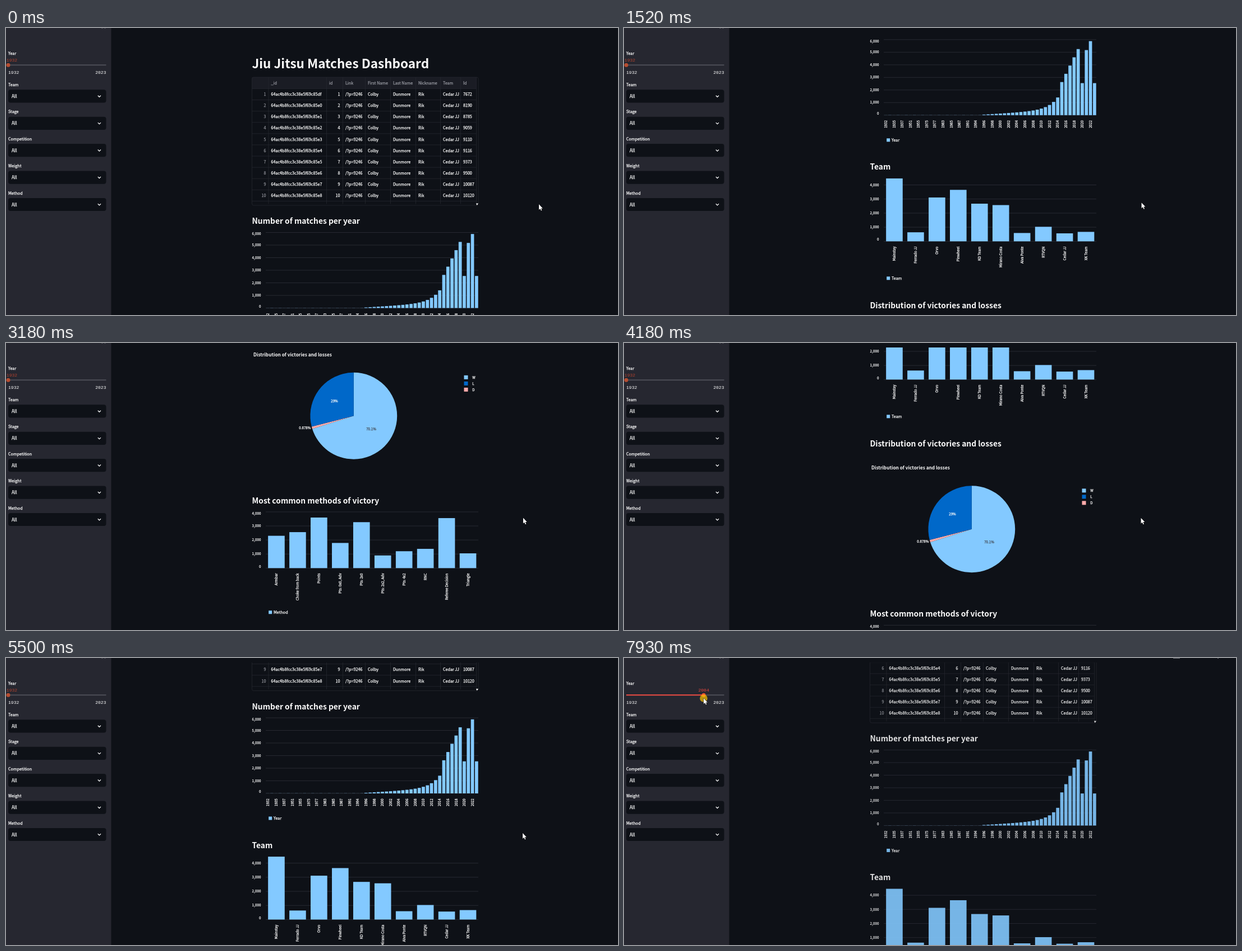
An HTML page with a canvas for the animation above (8 s loop, 1091 px wide and 513 px high).

```html
<!DOCTYPE html>
<html lang="en">
<head>
<meta charset="utf-8">
<title>Jiu Jitsu Matches Dashboard</title>
<style>
html, body { margin: 0; width: 100%; height: 100%; overflow: hidden; background: #0e1117; }
canvas { display: block; }
</style>
</head>
<body>
<canvas id="stage" width="1091" height="513"></canvas>
<script>
const ctx = document.getElementById('stage').getContext('2d');
const LOOP = 8000, STEP = 110.57, NOTCH = 57.45;
const SANS = '"Noto Sans CJK JP", "Noto Sans CJK SC", "Noto Sans CJK", "Noto Sans", sans-serif';
const MONO = '"Liberation Mono", monospace';
const BG = '#0e1117', PANEL = '#262730', WHITE = '#fafafa', SKY = '#83c9ff', BLUE = '#0068c9', PINK = '#ffabab';
const GRID = '#2e3039', BORDER = '#25272f';

const clamp01 = v => Math.min(1, Math.max(0, v));

// Wheel bursts, timed in steps of the recording's frame rate.
const bursts = [
  { start: 2, length: 5, notches: 3, power: 1.9 },
  { start: 8, length: 4, notches: 3 },
  { start: 13, length: 5, notches: 3 },
  { start: 19, length: 5, notches: 3 },
  { start: 25, length: 3, notches: 3.5, power: 0.36 },
  { start: 33, length: 3, notches: -4 },
  { start: 39, length: 4, notches: -4 },
  { start: 45, length: 4, notches: -4 }
];
const scrollAt = step => bursts.reduce((sum, { start, length, notches, power = 1 }) =>
  sum + NOTCH * notches * clamp01((step - start) / length) ** power, 0);

const cursorPath = [
  { step: -1, x: 950, y: 315 }, { step: 1, x: 923, y: 312 }, { step: 50, x: 921, y: 313 },
  { step: 52, x: 853, y: 160 }, { step: 53, x: 114, y: 99 }
];

function cursorAt(step) {
  const next = cursorPath.findIndex(point => point.step >= step);
  const b = cursorPath[next], a = cursorPath[next - 1] || b;
  const u = clamp01((step - a.step) / (b.step - a.step || 1));
  return [a.x + (b.x - a.x) * u, a.y + (b.y - a.y) * u];
}

function rect(x, y, w, h, color) {
  ctx.fillStyle = color;
  ctx.fillRect(x, y, w, h);
}

function line(x1, y1, x2, y2, color) {
  ctx.strokeStyle = color;
  ctx.lineWidth = 0.8;
  ctx.beginPath();
  ctx.moveTo(x1, y1);
  ctx.lineTo(x2, y2);
  ctx.stroke();
}

function disc(x, y, r, color) {
  ctx.fillStyle = color;
  ctx.beginPath();
  ctx.arc(x, y, r, 0, Math.PI * 2);
  ctx.fill();
}

function roundBox(x, y, w, h, r) {
  ctx.beginPath();
  ctx.roundRect(x, y, w, h, r);
}

// y is the middle of the capital letters; a hairline stroke firms up small regular text
function text(str, x, y, size, { color = WHITE, align = 'left', weight = 400, family = SANS } = {}) {
  const baseline = y + size * (family === MONO ? 0.33 : 0.366);
  ctx.font = `${weight} ${size}px ${family}`;
  ctx.textAlign = align;
  ctx.fillStyle = color;
  ctx.fillText(str, x, baseline);
  if (weight > 400 || family === MONO) return;
  ctx.strokeStyle = color;
  ctx.lineWidth = 0.25;
  ctx.strokeText(str, x, baseline);
}

const heading = (str, y) => text(str, 438.5, y, 13.83, { weight: 700 });

function table() {
  const left = 438.5, right = 838.5, top = 88, bottom = 317, head = 20.4, rowH = 20.1;
  const columns = [
    { x: 468, title: '_id', cell: i => '64ac4b8fcc3c38e5f69c85' + (0xdf + i).toString(16) },
    { x: 571.5, title: 'id', cell: () => '' },
    { x: 600.5, title: 'Link', cell: () => '/?p=9246' },
    { x: 640.5, title: 'First Name', cell: () => 'Colby' },
    { x: 685.5, title: 'Last Name', cell: () => 'Dunmore' },
    { x: 730.5, title: 'Nickname', cell: () => 'Rik' },
    { x: 774.5, title: 'Team', cell: () => 'Cedar JJ' },
    { x: 810.5, title: 'Id', cell: i => ids[i] }
  ];
  const ids = '7672 8190 8785 9059 9110 9116 9373 9500 10087 10120'.split(' ');

  rect(left, top, right - left, head, '#1a1c24');
  for (const { x, title } of columns) {
    line(x, top, x, bottom - 2.5, BORDER);
    text(title, x + 4.4, 98.2, 7.2, { color: '#94969e' });
  }
  line(right, top, right, bottom - 2.5, BORDER);
  for (let i = 0; i <= ids.length; i++) {
    const y = top + head + i * rowH;
    line(left, y, right, y, BORDER);
  }
  ids.forEach((_, i) => {
    const y = 118.5 + i * rowH;
    text(i + 1, 463.5, y, 7.2, { color: '#8b8d94', align: 'right' });
    text(i + 1, 595.5, y, 7.2, { align: 'right' });
    for (const { x, cell } of columns) text(cell(i), x + 4.4, y, 7.2);
  });

  ctx.strokeStyle = BORDER;
  ctx.lineWidth = 0.8;
  roundBox(left, top, 403.5, bottom - top, 3);
  ctx.stroke();
  ctx.fillStyle = WHITE;
  ctx.beginPath();
  ctx.moveTo(838, 313.5);
  ctx.lineTo(842, 313.5);
  ctx.lineTo(839.5, 317);
  ctx.fill();
}

function barChart({ axis, step, ticks, clampTop, bars, legend, legendY }) {
  const left = 463, pitch = 379.5 / bars.length, width = pitch * 0.78;
  for (let i = 0; i <= ticks; i++) {
    const y = axis - i * step;
    const shift = i === 0 ? -3 : i === ticks && clampTop ? 2.7 : 0;
    line(left, y, 842, y, GRID);
    text(i ? i + ',000' : '0', 454.5, y + shift, 6, { align: 'right', weight: 700 });
  }
  bars.forEach(([label, value], i) => {
    const center = left + pitch * (i + 0.5), h = value / 1000 * step;
    rect(center - width / 2, axis - h, width, h, SKY);
    ctx.save();
    ctx.translate(center, axis + 9.3);
    ctx.rotate(-Math.PI / 2);
    text(label, 0, 0, 6.2, { align: 'right' });
    ctx.restore();
  });
  rect(468.2, legendY - 3, 6, 6, SKY);
  text(legend, 477, legendY, 7.2);
}

// Slow growth, then exponential, then a steep linear climb with two short years.
function matchesIn(year) {
  if (year === 2020 || year === 2023) return 2545;
  if (year > 2020) return 5170 + 710 * (year - 2021);
  if (year > 2014) return 2630 + 655 * (year - 2015);
  return 45 + 20 * (year - 1996) + 1000 * 1.5 ** (year - 2014);
}

// Every second bar is labelled; the early years have gaps.
const earlyYears = '1932 1935 1937 1951 1955 1975 1977 1983 1985 1987 1991 1994'.split(' ');
const yearBars = earlyYears.flatMap(year => [[year, 4], ['', 8]]);
for (let year = 1996; year <= 2023; year++) yearBars.push([year % 2 ? '' : year, matchesIn(year)]);

const charts = [
  { axis: 500.5, step: 22.5, ticks: 6, clampTop: true, legend: 'Year', legendY: 545, bars: yearBars },
  { axis: 726, step: 25.2, ticks: 4, clampTop: false, legend: 'Team', legendY: 792,
    bars: [['Mainstay', 4460], ['Ferrado JJ', 640], ['Orvo', 3110], ['Pinwheel', 3650], ['KD Team', 2670],
      ['Mirano Costa', 2570], ['Alva Ponte', 590], ['RTVQN', 1030], ['Cedar JJ', 565], ['XK Team', 670]] },
  { axis: 1265.5, step: 25.1, ticks: 4, clampTop: true, legend: 'Method', legendY: 1344.5,
    bars: [['Armbar', 2300], ['Choke from back', 2560], ['Points', 3600], ['Pts: 0x0, Adv', 1790],
      ['Pts: 2x0', 3270], ['Pts: 2x2, Adv', 900], ['Pts: 4x2', 1200], ['RNC', 1370],
      ['Referee Decision', 3560], ['Triangle', 1050]] }
];

function pie() {
  const cx = 619.8, cy = 993.4, r = 77.4;
  let angle = -Math.PI / 2;
  [[0.7012, SKY], [0.00878, PINK], [0.29002, BLUE]].forEach(([share, color]) => {
    const end = angle + share * Math.PI * 2;
    ctx.fillStyle = color;
    ctx.beginPath();
    ctx.moveTo(cx, cy);
    ctx.arc(cx, cy, r, angle, end);
    ctx.fill();
    angle = end;
  });
  text('29%', 585.5, 966.7, 6.2, { align: 'center' });
  text('70.1%', 651, 1016.5, 6.2, { align: 'center', color: '#444b55' });
  text('0.878%', 543.5, 1015.2, 6.2, { align: 'right' });
  [['W', SKY], ['L', BLUE], ['D', PINK]].forEach(([name, color], i) => {
    const y = 924.5 + i * 11;
    rect(816.5, y - 3.5, 7, 7, color);
    text(name, 831.3, y, 6.2);
  });
}

function page(scroll, alpha) {
  ctx.save();
  ctx.globalAlpha = alpha;
  ctx.translate(0, -scroll);
  text('Jiu Jitsu Matches Dashboard', 438.5, 63.3, 22.5, { weight: 700 });
  table();
  heading('Number of matches per year', 345);
  heading('Team', 593);
  heading('Distribution of victories and losses', 840.3);
  text('Distribution of victories and losses', 441, 884, 8.25, { weight: 700 });
  pie();
  heading('Most common methods of victory', 1145);
  charts.forEach(barChart);
  ctx.restore();
  rect(187.5, 0, 904, 8, BG);
}

function sidebar(year, active) {
  const trackX = 4, trackW = 174.5;
  const thumb = trackX + trackW * (year - 1932) / 91;
  const accent = active ? '#e9463f' : '#b4432f';
  rect(0, 0, 187.5, 513, PANEL);
  rect(170, 0, 3, 1, '#4f5058');
  rect(175, 0, 3, 1, '#4f5058');

  text('Year', 4, 45, 7.2);
  text(year, Math.max(0.8, thumb - 9.6), 57, 8.05, { color: accent, family: MONO });
  rect(trackX, 65.2, trackW, 2, '#4d4e57');
  rect(trackX, 65.2, thumb - trackX, 2, accent);
  disc(thumb, 66.2, 3.5, active ? '#ef5138' : '#b84d30');
  text('1932', 4, 79, 8.05, { family: MONO });
  text('2023', 178.5, 79, 8.05, { family: MONO, align: 'right' });

  ['Team', 'Stage', 'Competition', 'Weight', 'Method'].forEach((label, i) => {
    const y = 122 + i * 48.4;
    text(label, 4, y - 20.7, 7.2);
    ctx.fillStyle = BG;
    roundBox(4, y - 11.7, 174.5, 23.2, 4);
    ctx.fill();
    text('All', 10, y, 8.24);
    ctx.strokeStyle = WHITE;
    ctx.lineWidth = 1.3;
    ctx.beginPath();
    ctx.moveTo(163.8, y - 1.3);
    ctx.lineTo(166.4, y + 1.3);
    ctx.lineTo(169, y - 1.3);
    ctx.stroke();
  });
}

const arrow = new Path2D('M0 0V10L2.3 7.9 3.9 11.6 5.4 11 3.9 7.4H6.9Z');

function cursor(x, y) {
  ctx.save();
  ctx.translate(x, y);
  ctx.strokeStyle = '#000';
  ctx.lineWidth = 0.8;
  ctx.stroke(arrow);
  ctx.fillStyle = '#fff';
  ctx.fill(arrow);
  ctx.restore();
}

function draw(time) {
  const step = Math.floor((time + 12 - 190) / STEP);
  const drag = 1 - (1 - clamp01((step - 61) / 9)) ** 1.5;
  const pressed = step >= 60;

  rect(0, 0, 1091, 513, BG);
  page(scrollAt(step), 1 - 0.11 * clamp01((step - 65) / 5));
  if (step >= 64) {
    rect(979, 0, 12, 1, '#6f7178');
    rect(1058, 0, 2, 1, '#6f7178');
  }
  sidebar(Math.round(1932 + 72 * drag), pressed);

  if (step <= 53) {
    cursor(...cursorAt(step));
  } else if (step >= 56) {
    const x = 3 + 139 * drag, y = 62 + 10 * drag;
    if (pressed) disc(x + 2 * (1 - drag), y, 6.8, 'rgba(255, 200, 0, 0.68)');
    cursor(x, y);
  }
}

function tick() {
  draw(performance.now() % LOOP);
  requestAnimationFrame(tick);
}
tick();
</script>
</body>
</html>
```
